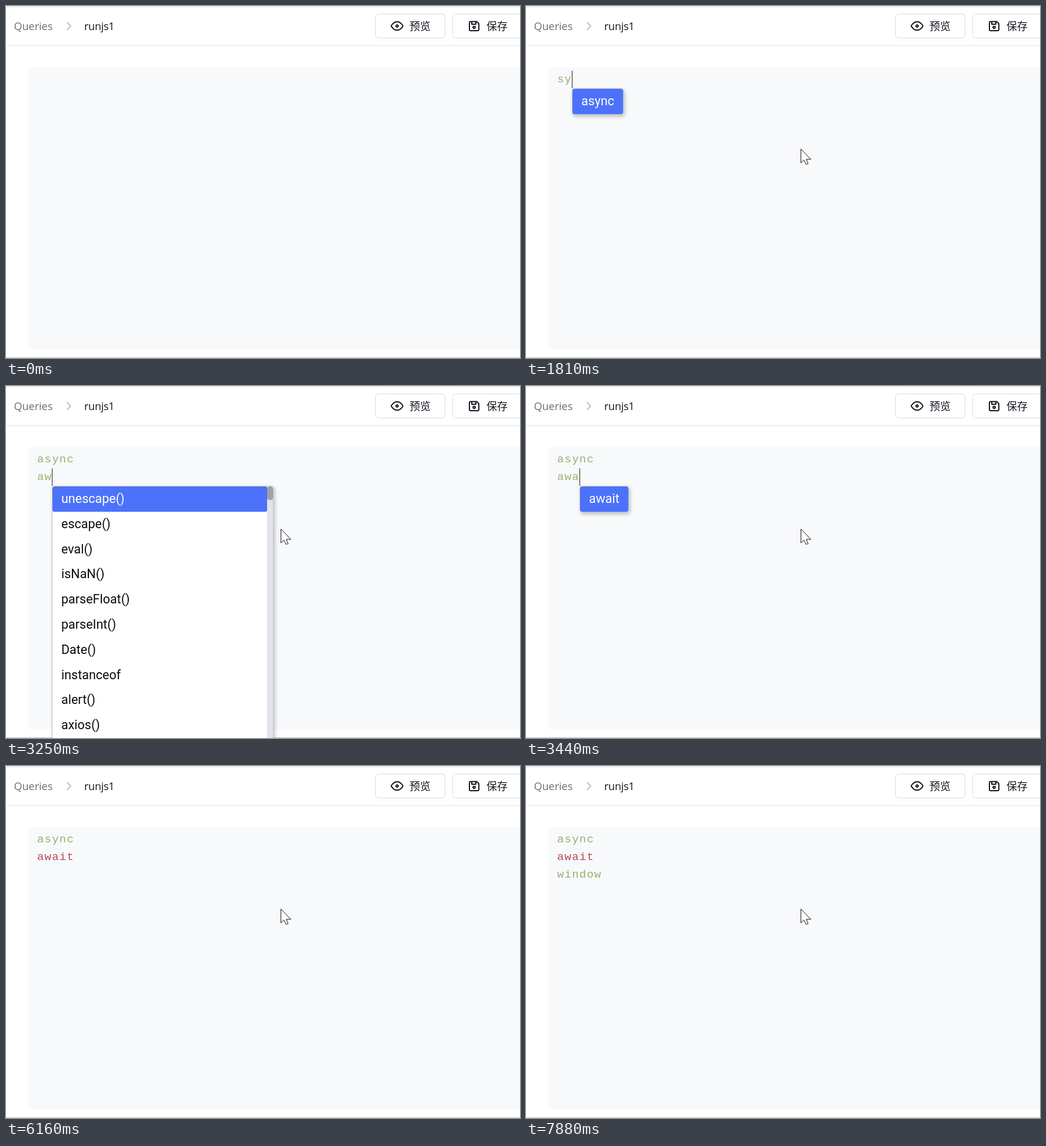
Write an HTML page that moves like this. It is 874 px wide and 599 px high and loops after 8 s.

```html
<!DOCTYPE html>
<html lang="zh">
<head>
<meta charset="utf-8">
<title>Query editor</title>
<style>
html, body { margin: 0; width: 100%; height: 100%; overflow: hidden; background: #fff; }
#stage { position: relative; width: 874px; height: 599px; overflow: hidden; }
svg { position: absolute; left: 0; top: 0; }
.crumb { font: 18px "Open Sans", sans-serif; }
.label { font: 18px "Noto Sans CJK SC", "Noto Sans CJK", sans-serif; fill: #141821; }
.icon { fill: none; stroke: #141821; stroke-width: 2; stroke-linejoin: round; }
.code { font: 19px "Liberation Mono", monospace; letter-spacing: 1.2px; fill: #9bae6e; }
.code .key { fill: #b34c55; }
#caret { position: absolute; width: 1px; height: 30px; background: #222; }
#hints {
  position: absolute; box-sizing: border-box; overflow: hidden; background: #fff;
  border: 1px solid #bfc3ca; border-radius: 4px; box-shadow: 2px 3px 6px rgba(0, 0, 0, .24);
  font: 21.5px/42.8px Roboto, sans-serif; color: #0c0c0c;
}
#hints div { padding: 0 15px; height: 42.8px; white-space: pre; }
#hints div:first-child { background: #4c72fb; color: #fff; border-radius: 3px; }
#hints.long { width: 377px; }
#hints.long div { margin-right: 10px; }
#hints.long::before, #hints.long::after {
  content: ""; position: absolute; right: 0; top: 0; width: 10px; height: 100%; background: #e1e4eb;
}
#hints.long::after { height: 23px; border-radius: 4px; background: #9ea1a6; }
</style>
</head>
<body>
<div id="stage">
  <svg width="874" height="599">
    <rect width="874" height="1" y="1" fill="#d9d9db"/>
    <rect width="874" height="1" y="67" fill="#e3e5e9"/>
    <rect width="850" height="480" x="38" y="104" rx="6" fill="#f8f9fb"/>
    <rect width="874" height="1" y="598" fill="#bcbcbc"/>
    <text class="crumb" x="13.5" y="41" fill="#687076">Queries</text>
    <path d="M103.5 27.5 110 34.2 103.5 41" fill="none" stroke="#c1c4c9" stroke-width="2"/>
    <text class="crumb" x="133" y="41" fill="#11181c" letter-spacing="-.25">runjs1</text>
    <g fill="#fff" stroke="#d7dbdf">
      <rect x="628.5" y="13.5" width="118" height="41" rx="5"/>
      <rect x="759.5" y="13.5" width="130" height="41" rx="5"/>
    </g>
    <g class="icon">
      <path d="M655 34Q659 26.8 665 26.8T675 34Q671 41.2 665 41.2T655 34Z"/>
      <circle cx="665" cy="34" r="1.8"/>
      <path d="M790 26.5H800.5L804 30V40Q804 42 802 42H790Q788 42 788 40V28.5Q788 26.5 790 26.5ZM792 27V31H799V27"/>
      <circle cx="796" cy="36.3" r="1.8"/>
    </g>
    <text class="label" x="686" y="41">预览</text>
    <text class="label" x="817" y="41">保存</text>
    <g class="code" id="code">
      <text x="53" y="130"></text>
      <text x="53" y="160"></text>
      <text x="53" y="190"></text>
    </g>
  </svg>
  <div id="caret"></div>
  <div id="hints"></div>
  <svg width="874" height="599">
    <path id="mouse" d="M.5.5V24L5.6 19.2 9.3 26.6 12.8 25.2 9.5 17.9H17.3Z" fill="#fff" stroke="#111"/>
  </svg>
</div>
<script>
const LOOP = 8000, CELL = 12.6, LEFT = 53, TOP = 110, ROW = 30;
const lists = {
  async: ["async"],
  all: ["unescape()", "escape()", "eval()", "isNaN()", "parseFloat()", "parseInt()",
    "Date()", "instanceof", "alert()", "axios()", "moment()"],
  await: ["await"],
  with: ["with", "_.without", "actions.switchPage()"]
};

// time, typed text, caret shown, open list
const steps = [
  [0, "", 0],
  [610, "", 1],
  [1140, "", 0],
  [1630, "s", 1],
  [1720, "sy", 1],
  [1810, "sy", 1, "async"],
  [2310, "async", 1],
  [2840, "async\n", 1],
  [3120, "async\na", 1],
  [3250, "async\naw", 1, "all"],
  [3350, "async\nawa", 1, "all"],
  [3440, "async\nawa", 1, "await"],
  [3850, "async\nawa", 1],
  [3950, "async\nawait", 1],
  [4450, "async\nawait", 0],
  [4540, "async\nawait\n", 1],
  [5080, "async\nawait\n", 0],
  [5670, "async\nawait\n", 1],
  [6160, "async\nawait\n", 0],
  [6480, "async\nawait\nw", 1],
  [6570, "async\nawait\nwi", 1],
  [6660, "async\nawait\nwin", 1, "with"],
  [6790, "async\nawait\nwind", 1],
  [6880, "async\nawait\nwindo", 1],
  [7290, "async\nawait\nwindow", 1],
  [7880, "async\nawait\nwindow", 0]
];

// time, share of the way from entry to rest
const moves = [[0, null], [190, 0], [290, .3], [400, .72], [510, .96], [610, 1]];

const $ = id => document.getElementById(id);
const caret = $("caret"), hints = $("hints"), mouse = $("mouse");
const rows = [...$("code").children];
const at = (table, t) => table.findLast(row => row[0] <= t);

function showStep([, text, blink, list]) {
  const lines = text.split("\n"), last = lines.length - 1;
  rows.forEach((row, i) => {
    row.textContent = lines[i] || "";
    row.classList.toggle("key", lines[i] === "await");
  });
  const x = Math.round(LEFT + CELL * lines[last].length), y = TOP + ROW * last;
  caret.style.cssText = `left:${x}px;top:${y}px;opacity:${blink}`;
  hints.style.cssText = `left:${x}px;top:${y + ROW}px;display:${list ? "block" : "none"}`;
  hints.className = list === "all" ? "long" : "";
  hints.replaceChildren(...(lists[list] || []).map(name => {
    const item = document.createElement("div");
    item.textContent = name;
    return item;
  }));
}

function showMouse([, k]) {
  mouse.setAttribute("visibility", k === null ? "hidden" : "visible");
  mouse.setAttribute("transform", `translate(${Math.round(692 - 225 * k)} ${Math.round(447 - 204 * k)})`);
}

let shown;
function draw() {
  const t = performance.now() % LOOP, step = at(steps, t);
  if (step !== shown) showStep(shown = step);
  showMouse(at(moves, t));
  requestAnimationFrame(draw);
}
draw();
</script>
</body>
</html>
```
